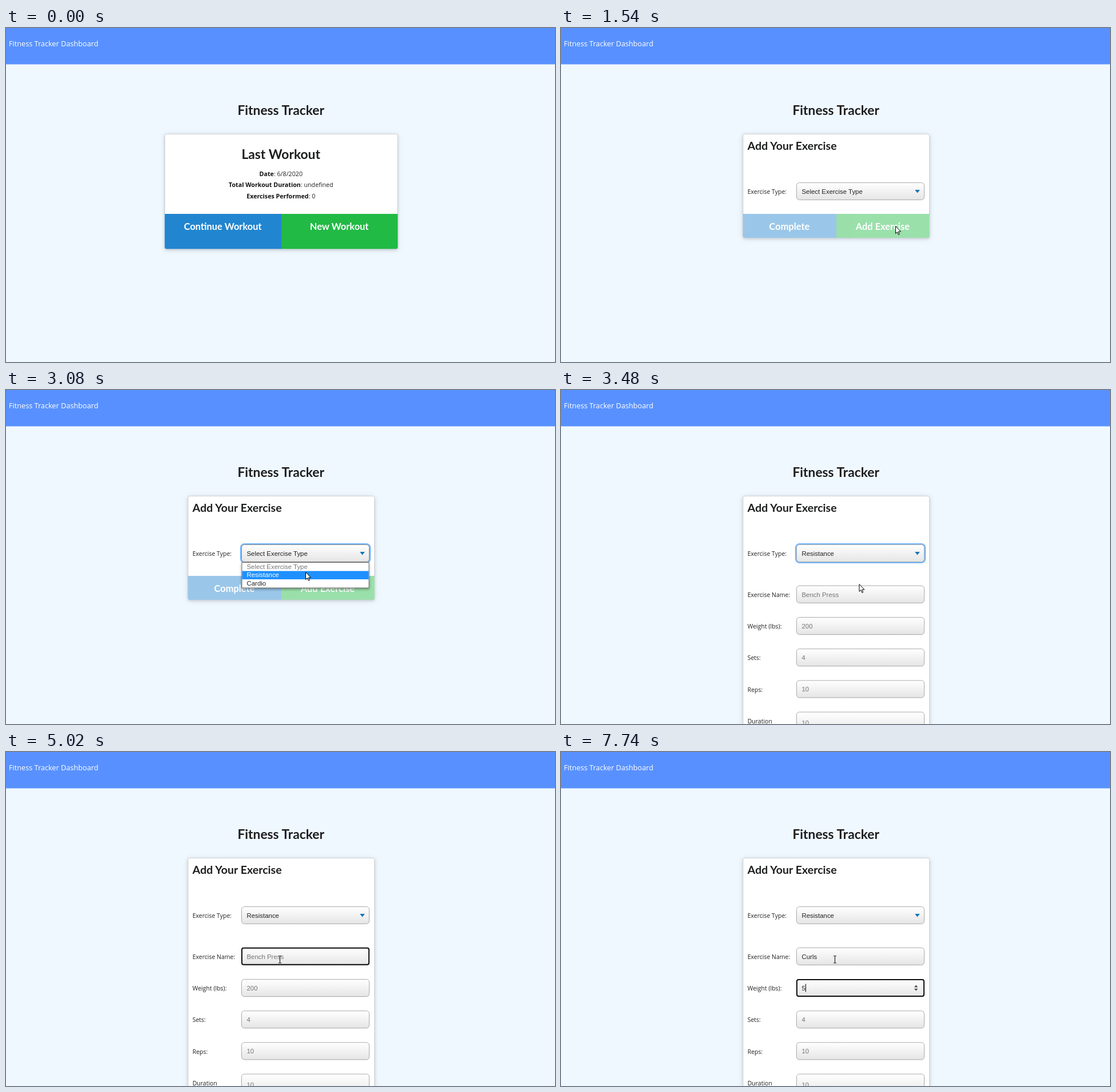
Animation of 959 by 584 pixels, one loop 8 s. Source, as an HTML page:

```html
<!DOCTYPE html>
<html lang="en">
<head>
<meta charset="utf-8">
<title>Fitness Tracker</title>
<style>
html, body { margin: 0; width: 100%; height: 100%; overflow: hidden; background: #f0f8ff; }
svg { display: block; width: 959px; height: 584px; }
text { white-space: pre; }
.head { font: 700 22.8px Lato, sans-serif; fill: #1d1e1f; text-anchor: middle; }
.sub { font-size: 19.57px; text-anchor: start; }
.btn { font: 700 16.4px Lato, sans-serif; fill: #fff; text-anchor: middle; }
.nav { font: 12.7px "Open Sans", sans-serif; fill: #fff; }
.stat { font: 10.7px "Open Sans", sans-serif; fill: #212121; text-anchor: middle; }
.stat tspan { font-weight: 700; fill: #111; }
.label { font: 10.5px "Open Sans", sans-serif; fill: #212121; }
.field { font: 11.41px "Liberation Sans", Arial, sans-serif; fill: #222; }
.hint { fill: #757575; }
.card { fill: #fff; stroke: #d3d4d6; filter: drop-shadow(0 2px 2px rgba(34,36,38,.12)) drop-shadow(0 1px 4px rgba(34,36,38,.13)); }
.box { fill: url(#shade); stroke: #aaa; }
.focus { fill: none; stroke: #101010; stroke-width: 2; }
.list { fill: #fff; stroke: #6f6f6f; filter: drop-shadow(0 2px 2px rgba(0,0,0,.35)); }
#cursor path { fill: #fff; stroke: #000; stroke-linejoin: round; }
#cursor .beam { fill: none; }
</style>
</head>
<body>
<svg id="stage" viewBox="0 0 959 584"></svg>
<script>
const LOOP = 8000;
const stage = document.getElementById('stage');
const $ = id => document.getElementById(id);

const text = (cls, x, y, s, id = '') => `<text class="${cls}" x="${x}" y="${y}" id="${id}">${s}</text>`;
const rect = (cls, x, y, w, h, r = 0, more = '') =>
  `<rect class="${cls}" x="${x}" y="${y}" width="${w}" height="${h}" rx="${r}" ${more}/>`;
const group = (id, ...parts) => `<g id="${id}">${parts.join('')}</g>`;
const stat = (y, name, value) => text('stat', 480.3, y, `<tspan>${name}</tspan>: ${value}`);
const label = (y, s) => text('label', 325.7, y, s);

// Two buttons side by side, rounded at the outer lower corners
function buttons(left, right, bottom, first, second, opacity) {
  const top = 325, mid = 481, r = 3;
  return `<g opacity="${opacity}">
    <path fill="#2185d0" d="M${left} ${top}H${mid}V${bottom}H${left + r}q${-r} 0 ${-r} ${-r}z"/>
    <path fill="#21ba45" id="go${bottom}" d="M${right} ${top}H${mid}V${bottom}H${right - r}q${r} 0 ${r} ${-r}z"/></g>`
    + text('btn', (left + mid) / 2 - .5, 353, first) + text('btn', (right + mid) / 2 - .5, 353, second);
}

function input(y, hint, id = '', h = 30) {
  return rect('box', 411.5, y + 1, 223, h, 5, 'style="fill:none;stroke:#0000000a"')
    + rect('box', 411.5, y, 223, h, 5) + text('field hint', 420.5, y + h / 2 + 4.2, hint, id);
}

const rows = [
  ['Exercise Name:', 'Bench Press', 'name'],
  ['Weight (lbs):', '200', 'weight'],
  ['Sets:', '4'],
  ['Reps:', '10'],
  ['Duration', '10', '', 38]
];

stage.innerHTML = `<defs><linearGradient id="shade" x2="0" y2="1">
    <stop stop-color="#fff"/><stop offset="1" stop-color="#e5e5e5"/></linearGradient></defs>`
  + rect('', 0, 0, 959, 584, 0, 'fill="#f0f8ff"')
  + rect('', 0, 0, 959, 63.5, 0, 'fill="#5891ff"')
  + text('nav', 5, 32.3, 'Fitness Tracker Dashboard')
  + text('head', 480.2, 152, 'Fitness Tracker')
  + group('summary',
      rect('card', 277.5, 185.5, 406.5, 200.5, 3),
      text('head', 480.2, 229, 'Last Workout'),
      stat(258.6, 'Date', '6/8/2020'),
      stat(278.2, 'Total Workout Duration', 'undefined'),
      stat(297.7, 'Exercises Performed', '0'),
      buttons(277.3, 684.3, 386.3, 'Continue Workout', 'New Workout', 1))
  + group('exercise',
      rect('card', 318, 185.5, 325.5, 181, 3, 'id="sheet"'),
      text('head sub', 325.8, 213, 'Add Your Exercise'),
      group('actions', rect('', 318, 325, 325.8, 41.5, 3, 'fill="#fff"'),
        buttons(317.8, 643.8, 366.8, 'Complete', 'Add Exercise', .45)),
      label(290.4, 'Exercise Type:'),
      rect('', 410.2, 269.3, 225.8, 32.4, 6.5, 'id="ring" fill="none" stroke="#76b8fc" stroke-width="2.6"'),
      rect('box', 411.5, 270.5, 223, 30, 5, 'id="select"'),
      text('field', 420.5, 289.5, '', 'choice'),
      '<path fill="#0f74b5" d="M618.2 283h8.6l-4.3 5.6z"/>',
      group('details',
        ...rows.map(([name, hint, id, h], i) =>
          label(361.8 + i * 55.3, name) + input(342.3 + i * 55.2, hint, id, h)),
        rect('focus', 412, 0, 222, 29, 3, 'id="outline"'),
        '<path id="spin" fill="#484848" d="M617 411.2h6.4l-3.2-3.6zM617 413.8h6.4l-3.2 3.6z"/>',
        rect('', 0, 0, 1, 14, 0, 'id="caret"')),
      group('menu',
        rect('list', 412, 301.5, 222, 44.5),
        rect('', 412.5, 302, 221, 14.5, 0, 'id="mark"'),
        text('field hint', 420.5, 312.5, 'Select Exercise Type'),
        text('field', 420.5, 327, 'Resistance', 'option'),
        text('field', 420.5, 341.6, 'Cardio')))
  + group('cursor',
      '<path id="arrow" d="M.5.5V13.4L3.4 10.7 5.4 15.4 7.3 14.6 5.3 10H9.5z"/>',
      `<path id="hand" d="M3.8 11.5V1.6a1.1 1.1 0 0 1 2.3 0V6.4a1.1 1.1 0 0 1 2.2.2a1.1 1.1 0 0 1 2.2.4
        a1.1 1.1 0 0 1 2.1.6V12.5Q12.6 15 11 18.5H5.2Q3.2 14.6 .8 11.6A1.2 1.2 0 0 1 2.5 9.9z"/>`,
      '<path id="beam" class="beam" d="M-2.5-6.5h1.7l.8.6.8-.6h1.7M0-6V5.5M-2.5 6h1.7l.8-.6.8.6h1.7"/>');

// [start, cursor, x, y]
const moves = [
  [0, ''], [360, 'arrow', 726, 507], [760, 'hand', 605, 380], [1140, 'hand', 579.5, 346.5],
  [1540, 'arrow', 584, 346], [1920, 'arrow', 525.5, 289.5], [2700, 'arrow', 525.5, 314],
  [3080, 'arrow', 523, 318], [3480, 'arrow', 520.5, 339], [3860, 'arrow', 481, 309],
  [4240, 'beam', 478.5, 363]
];
const names = [[0, ''], [5800, 'Cu'], [6180, 'Curls']];
const carets = [[0, false], [4640, true], [5020, false], [5800, true], [6960, false], [7740, true]];

const at = (list, t) => list.filter(step => step[0] <= t).pop();
const show = (id, on) => $(id).style.display = on ? '' : 'none';

function fill(id, value, hint) {
  $(id).textContent = value || hint;
  $(id).classList.toggle('hint', !value);
}

function render(t) {
  const open = t >= 2300 && t < 3480, hot = t >= 3080;
  const detailed = t >= 3480, focused = t >= 4640, onWeight = t >= 6580;

  show('summary', t < 1540);
  show('exercise', t >= 1540);
  $('go386.3').setAttribute('fill', t < 760 ? '#21ba45' : t < 1140 ? '#1cb33f' : '#16ab39');

  show('actions', !detailed);
  show('details', detailed);
  $('sheet').setAttribute('height', detailed ? 520 : 181);
  $('choice').textContent = detailed ? 'Resistance' : 'Select Exercise Type';
  $('select').style.stroke = t >= 1920 && t < 3480 ? '#888' : '#aaa';
  show('ring', t >= 2300 && !focused);

  show('menu', open);
  $('mark').setAttribute('y', hot ? 316.5 : 302);
  $('mark').setAttribute('fill', hot ? '#1e90ff' : '#c8c8c8');
  $('option').style.fill = hot ? '#fff' : '#222';

  const name = at(names, t)[1], weight = t >= 7740 ? '5' : '';
  fill('name', name, 'Bench Press');
  fill('weight', weight, '200');
  show('outline', focused);
  $('outline').setAttribute('y', onWeight ? 398 : 342.8);
  show('spin', onWeight);

  show('caret', at(carets, t)[1]);
  const typed = onWeight ? weight : name;
  const width = typed ? $(onWeight ? 'weight' : 'name').getComputedTextLength() : 0;
  $('caret').setAttribute('x', Math.round(420.4 + width));
  $('caret').setAttribute('y', onWeight ? 405.5 : 350);

  const [, kind, x = 0, y = 0] = at(moves, t);
  for (const id of ['arrow', 'hand', 'beam']) show(id, id === kind);
  $('cursor').setAttribute('transform', `translate(${x} ${y})`);
}

const start = performance.now();
function tick() {
  render((performance.now() - start) % LOOP);
  requestAnimationFrame(tick);
}
tick();
</script>
</body>
</html>
```
